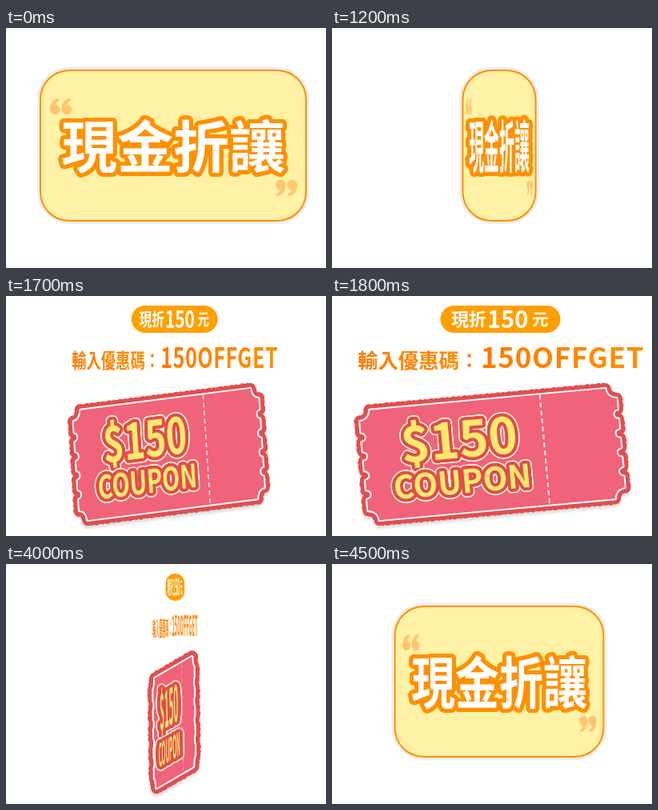
Animation of 400 by 300 pixels, one loop 4600 ms. Source, as an HTML page with a canvas:

```html
<!DOCTYPE html>
<html lang="zh-Hant">
<head>
<meta charset="utf-8">
<title>Coupon flip</title>
<style>
  html, body { margin: 0; width: 100%; height: 100%; overflow: hidden; background: #fff; }
  canvas { display: block; }
</style>
</head>
<body>
<canvas id="stage" width="400" height="300"></canvas>
<script>
const ctx = document.getElementById('stage').getContext('2d');
const FAMILY = '"Noto Sans CJK TC", "Noto Sans CJK", "Noto Sans", sans-serif';
const ORANGE = '#ff9100', DEEP_ORANGE = '#ff7a00', AMBER = '#ffa000';
const RED = '#e04f50', PINK = '#f0637a', YELLOW = '#ffea6c';
const LOOP = 4600, STEP = 100, FLIP_OUT = 1000, FLIP_BACK = 3800;

// Widths during a flip: the front narrows, then the back widens.
const FLIP = [
  ...[0.784, 0.53, 0.27, 0.004].map(width => ({ draw: drawFront, width })),
  ...[0.01, 0.157, 0.44, 0.72].map(width => ({ draw: drawBack, width })),
];

// Squeezes the picture horizontally around centerX; dx, dy shift it in screen pixels.
function squeeze(width, centerX, dx = 0, dy = 0) {
  ctx.setTransform(width, 0, 0, 1, centerX * (1 - width) + dx, dy);
}

// Strokes the current path outwards by a margin that is not squeezed.
function outline(margin, color, dash = []) {
  ctx.save();
  ctx.resetTransform();
  ctx.lineJoin = 'round';
  ctx.lineWidth = margin * 2;
  ctx.strokeStyle = color;
  ctx.setLineDash(dash);
  ctx.stroke();
  ctx.restore();
}

function fill(color) {
  ctx.fillStyle = color;
  ctx.fill();
}

// Box path whose corners stay circular while it is squeezed.
function roundBox(x, y, w, h, radius, width) {
  ctx.beginPath();
  ctx.roundRect(x, y, w, h, { x: radius / width, y: radius });
}

function text(string, x, y, size, color, align = 'left', spacing = 0) {
  ctx.font = `700 ${size}px ${FAMILY}`;
  ctx.textAlign = align;
  ctx.letterSpacing = spacing + 'px';
  ctx.fillStyle = color;
  ctx.fillText(string, x, y);
}

function orangeBlend(from, to) {
  const blend = ctx.createLinearGradient(from, 0, to, 0);
  blend.addColorStop(0, DEEP_ORANGE);
  blend.addColorStop(1, ORANGE);
  return blend;
}

// Grows text by an even margin that is not squeezed.
function growText(margin, color, place, ...label) {
  const [string, x, y, size] = label;
  for (let r = margin; r > 0; r -= 2) {
    for (let i = 0; i < 32; i++) {
      const angle = i * Math.PI / 16;
      place(r * Math.cos(angle), r * Math.sin(angle));
      text(string, x, y, size, color, 'center');
    }
  }
  place(0, 0);
}

function quoteMarks(x, y, turn) {
  ctx.save();
  ctx.translate(x, y);
  ctx.rotate(turn);
  for (const left of [-13.5, 1]) {
    ctx.beginPath();
    ctx.moveTo(left, 4);
    ctx.bezierCurveTo(left, -4, left + 4, -9, left + 10, -10);
    ctx.quadraticCurveTo(left + 13, -9, left + 11, -7);
    ctx.quadraticCurveTo(left + 7, -5, left + 7, -2);
    ctx.arc(left + 6.3, 4, 6.3, -Math.PI / 2, Math.PI);
    fill('#ffc670');
  }
  ctx.restore();
}

function drawFront(width) {
  const place = (dx, dy) => squeeze(width, 209, dx, dy);
  place(0, 0);
  roundBox(44, 54, 330, 186, 35, width);
  outline(5, '#eeeeee');
  outline(2, ORANGE);
  fill('#fff1a6');
  quoteMarks(68.5, 98, 0);
  quoteMarks(350.5, 200, Math.PI);

  const title = ['現金折讓', 209, 175, 70];
  growText(5, ORANGE, place, ...title);
  text(...title, '#fff', 'center');
}

// Ticket with scooped corners and four notches on each short side.
function ticketPath(halfW, halfH) {
  const quarter = Math.PI / 2, scoop = 13, notch = 6;
  const notches = [-36, -12, 12, 36];
  ctx.beginPath();
  ctx.arc(halfW, -halfH, scoop, 2 * quarter, quarter, true);
  for (const y of notches) ctx.arc(halfW, y, notch, -quarter, quarter, true);
  ctx.arc(halfW, halfH, scoop, -quarter, -2 * quarter, true);
  ctx.arc(-halfW, halfH, scoop, 0, -quarter, true);
  for (const y of notches) ctx.arc(-halfW, -y, notch, quarter, -quarter, true);
  ctx.arc(-halfW, -halfH, scoop, quarter, 0, true);
  ctx.closePath();
}

function drawCoupon(width) {
  const place = (dx, dy) => {
    squeeze(width, 212, dx, dy);
    ctx.translate(200.5, 198);
    ctx.rotate(-5.2 * Math.PI / 180);
  };
  place(0, 0);
  ticketPath(161, 69);
  ctx.shadowColor = 'rgba(0, 0, 0, 0.12)';
  ctx.shadowOffsetY = 4;
  ctx.shadowBlur = 3;
  outline(7, RED);
  ctx.shadowColor = 'transparent';
  outline(7.7, RED, [4, 3, 2, 5]);
  outline(2, '#fff');
  fill(PINK);

  ctx.beginPath();
  ctx.moveTo(65.7, -69);
  ctx.lineTo(65.7, 69);
  ctx.setLineDash([6, 4]);
  ctx.lineWidth = 2;
  ctx.strokeStyle = '#fdeaed';
  ctx.stroke();
  ctx.setLineDash([]);

  for (const label of [['$150', -39.9, 0.5, 62], ['COUPON', -40.4, 45, 40]]) {
    growText(5.5, '#fff3d0', place, ...label);
    growText(3.8, RED, place, ...label);
    text(...label, YELLOW, 'center');
  }
}

function drawBack(width) {
  squeeze(width, 211.5);
  roundBox(135.5, 12, 150, 34, 17, width);
  fill(AMBER);
  text('現折', 149, 37, 22, '#fff');
  text('150', 194, 40, 29, '#fff');
  text('元', 250, 37, 20.5, '#fff');
  text('輸入優惠碼：', 32, 90, 25.4, orangeBlend(32, 184));
  text('150OFFGET', 186, 90, 35, orangeBlend(186, 390), 'left', 0.7);
  drawCoupon(width);
}

function poseAt(time) {
  if (time < FLIP_OUT) return { draw: drawFront, width: 1 };
  const out = Math.floor((time - FLIP_OUT) / STEP);
  if (out < FLIP.length) return FLIP[out];
  if (time < FLIP_BACK) return { draw: drawBack, width: 1 };
  return FLIP[FLIP.length - 1 - Math.floor((time - FLIP_BACK) / STEP)];
}

function render() {
  const { draw, width } = poseAt(performance.now() % LOOP);
  ctx.resetTransform();
  ctx.fillStyle = '#fff';
  ctx.fillRect(0, 0, 400, 300);
  draw(width);
  requestAnimationFrame(render);
}
render();
</script>
</body>
</html>
```
